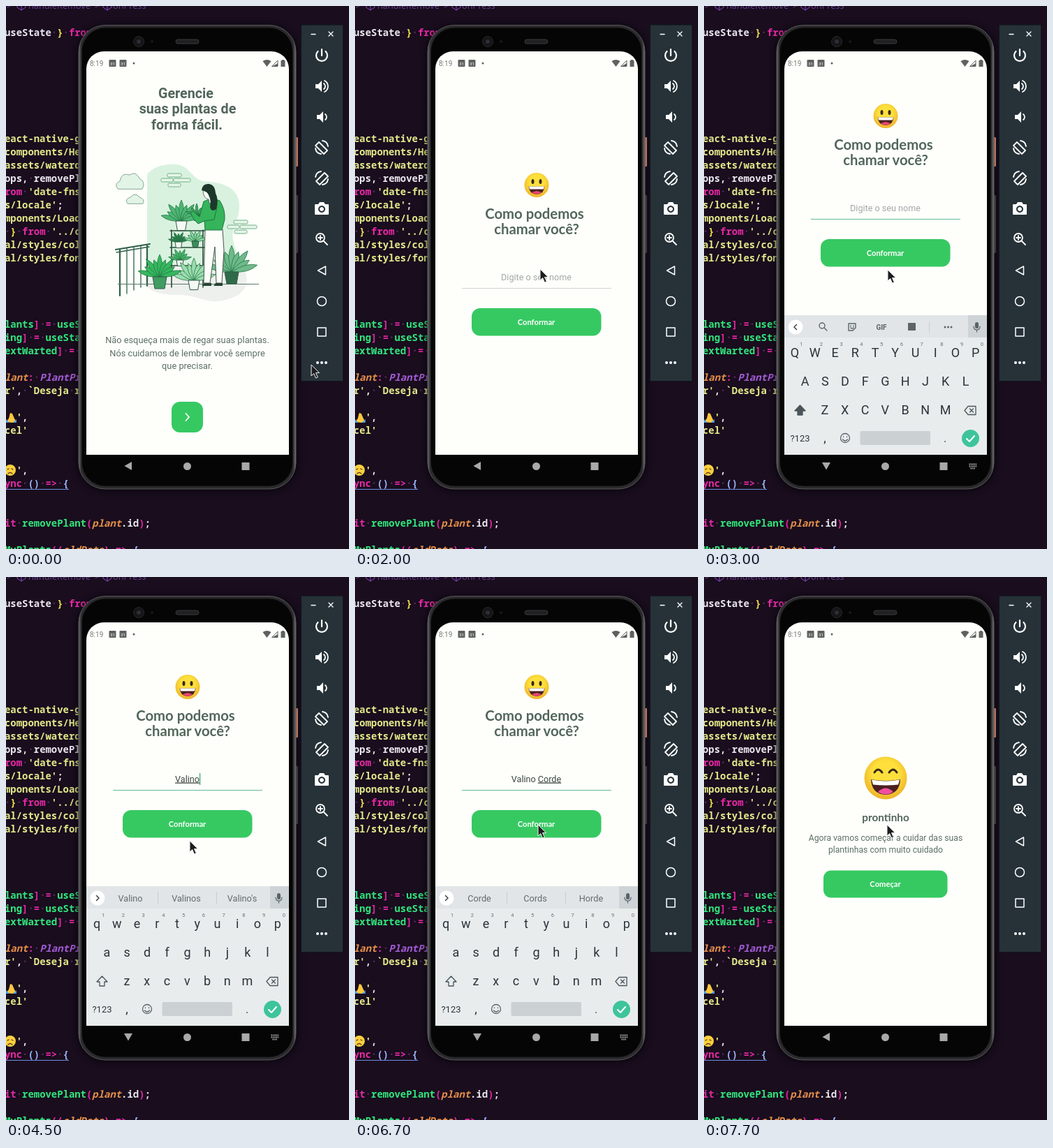
An HTML page that plays this animation: 491 by 778 pixels, repeating every 8 s.

```html
<!DOCTYPE html>
<html lang="pt-BR">
<head>
<meta charset="utf-8">
<title>Plant app onboarding</title>
<style>
  html, body { margin: 0; width: 100%; height: 100%; overflow: hidden; background: #190d1e; }
  svg { display: block; width: 100vw; height: 100vh; }
  text { font-family: Roboto, sans-serif; white-space: pre; }
  .mid text, text.mid { text-anchor: middle; }
  .code text { font: 600 13.93px "Noto Sans Mono", "DejaVu Sans Mono", monospace; }
  .dot { fill: #59265c; }
  .crumb text { font: 12.7px "Noto Sans", sans-serif; }
  .head { font: bold 19.7px Roboto, sans-serif; fill: #52665a; }
  .title { font: bold 20.3px Lato, sans-serif; fill: #52665a; }
  .body { font: 12.8px Lato, sans-serif; fill: #5c6f64; }
  .label { font: bold 11.2px Lato, sans-serif; fill: #fff; }
  .field { font-size: 12.6px; }
  .key { font-size: 18px; fill: #2b3439; }
  .hint { font-size: 7.5px; fill: #667076; }
  .word { font-size: 12.7px; fill: #626b70; }
  .line { fill: none; stroke-linecap: round; stroke-linejoin: round; }

  .anim { animation: 8s step-end infinite; }
  .page { transform-origin: 260px 354px; }
  #welcome { animation-name: welcome; }
  #next { animation-name: next; }
  #ask { animation-name: ask; }
  #lift { animation-name: lift; }
  #rule { animation-name: rule; }
  #confirm { animation-name: confirm; }
  #done { animation-name: done; }
  #keyboard { animation-name: keyboard; }
  #back { animation-name: back; transform-origin: 175px 659px; }
  #kbIcon { animation-name: kbIcon; }
  #cursor { animation-name: cursor; }

  @keyframes welcome {
    0% { opacity: 1; transform: scale(1); }
    12.5% { opacity: .6; transform: scale(1.03); }
    13.75% { opacity: .33; transform: scale(1.075); }
    15% { opacity: .08; transform: scale(1.095); }
    16.25%, 100% { opacity: 0; transform: scale(1.1); }
  }
  @keyframes next { 0% { opacity: 1; } 11.25%, 100% { opacity: .75; } }
  @keyframes ask {
    0% { opacity: 0; transform: scale(.95); }
    15% { opacity: .3; transform: scale(.97); }
    16.25% { opacity: .7; transform: scale(.99); }
    17.5% { opacity: 1; transform: scale(1); }
    87.5% { opacity: .6; transform: scale(1.02); }
    88.75% { opacity: .33; transform: scale(1.06); }
    90% { opacity: .08; transform: scale(1.09); }
    91.25%, 100% { opacity: 0; transform: scale(1.1); }
  }
  @keyframes lift {
    0% { transform: translateY(0); }
    31.25% { transform: translateY(-99px); }
    88.75%, 100% { transform: translateY(0); }
  }
  @keyframes rule { 0% { stroke: #cfd3cf; } 28.75%, 100% { stroke: #63bb92; } }
  @keyframes confirm { 0% { opacity: 1; } 86.25%, 100% { opacity: .7; } }
  @keyframes done {
    0% { opacity: 0; transform: scale(.95); }
    90% { opacity: .2; transform: scale(.96); }
    91.25% { opacity: .5; transform: scale(.98); }
    92.5% { opacity: .8; transform: scale(.99); }
    93.75% { opacity: .95; transform: scale(1); }
    96.25%, 100% { opacity: 1; transform: scale(1); }
  }
  @keyframes keyboard {
    0% { transform: translateY(200px); }
    30% { transform: translateY(140px); }
    31.25% { transform: translateY(60px); }
    32.5% { transform: translateY(15px); }
    33.75% { transform: translateY(0); }
    87.5% { transform: translateY(30px); }
    88.75% { transform: translateY(110px); }
    90%, 100% { transform: translateY(200px); }
  }
  @keyframes back {
    0% { transform: rotate(0deg); }
    30% { transform: rotate(-90deg); }
    88.75%, 100% { transform: rotate(0deg); }
  }
  @keyframes kbIcon { 0% { opacity: 0; } 30% { opacity: 1; } 88.75%, 100% { opacity: 0; } }
  @keyframes cursor {
    0% { transform: translate(437px, 514px); }
    2.5% { transform: translate(404px, 531px); }
    3.75% { transform: translate(345px, 551px); }
    5% { transform: translate(297px, 559px); }
    7.5% { transform: translate(262px, 580px); }
    8.75% { transform: translate(244px, 592px); }
    20% { transform: translate(312px, 433px); }
    21.25% { transform: translate(327px, 453px); }
    25% { transform: translate(265px, 377px); }
    26.25% { transform: translate(263px, 378px); }
    80% { transform: translate(300px, 366px); }
    81.25% { transform: translate(340px, 346px); }
    82.5% { transform: translate(280px, 352px); }
    83.75%, 100% { transform: translate(262px, 355px); }
  }
</style>
</head>
<body>
<svg viewBox="0 0 491 778">
  <defs>
    <clipPath id="glass"><path d="M115 643V90a25 25 0 0 1 25-25H380a25 25 0 0 1 25 25V643z"/></clipPath>
    <radialGradient id="skin" cx=".5" cy=".4" r=".6">
      <stop offset=".5" stop-color="#fde03c"/><stop offset="1" stop-color="#eeb22a"/>
    </radialGradient>
    <linearGradient id="rim">
      <stop offset="0" stop-color="#6a6a6c"/><stop offset=".012" stop-color="#2b2b2d"/>
      <stop offset=".988" stop-color="#2b2b2d"/><stop offset="1" stop-color="#777"/>
    </linearGradient>
    <filter id="shade" x="-10%" y="-5%" width="120%" height="110%"><feGaussianBlur stdDeviation="6"/></filter>
  </defs>
  <rect width="491" height="778" fill="#190d1e"/>

  <g class="crumb" fill="#67408c">
    <text x="1" y="4">&gt;</text><text x="32" y="4">handleRemove</text>
    <text x="127" y="4">&gt;</text><text x="153" y="4">onPress</text>
    <path class="line" stroke="#8a4bc0" d="M16-4v6l6 4 6-4v-6M22 0v6M16-4l6 4 6-4M139-4v6l6 4 6-4v-6M145 0v6M139-4l6 4 6-4"/>
  </g>
  <g class="code" id="code"></g>
  <path d="M0 692.5H90" stroke="#6f8de0"/>
  <g><path d="M0 596l4-5 2-8 3 1 3 7 3 5-6 1z" fill="#fbc83d"/><path d="M0 592l5 5H0zM15 592l-5 5h5z" fill="#4a9be8"/></g>
  <g><circle cx="6" cy="665" r="8" fill="#fbd03e"/><path class="line" stroke="#5c3a16" stroke-width="1.3" d="M2 664l2-1M8 663l2 1M3 670q3-3 6 0"/></g>

  <!-- phone -->
  <rect x="103" y="29" width="313" height="664" rx="38" fill="#000" opacity=".75" filter="url(#shade)"/>
  <rect x="413" y="188" width="5" height="42" rx="1" fill="#b0715c"/>
  <rect x="414" y="271" width="4" height="83" rx="1" fill="#38363a"/>
  <rect x="104" y="27.500" width="311" height="664.500" rx="38" fill="url(#rim)" stroke="#59595b"/>
  <rect x="108.500" y="31" width="302" height="657" rx="34" fill="#050505" stroke="#1c1c1e"/>
  <circle cx="190" cy="51" r="7.500" fill="#151517" stroke="#28282b"/>
  <circle cx="190" cy="51" r="3" fill="#2d2f36"/><circle cx="209" cy="51" r="2" fill="#19191b"/>
  <rect x="243" y="48" width="33" height="6" rx="3" fill="#202022" stroke="#39393b"/>

  <g clip-path="url(#glass)">
    <rect x="115" y="65" width="290" height="578" fill="#fefffb"/>

    <g class="page anim mid" id="welcome">
      <g class="head"><text x="257.500" y="131.500">Gerencie</text><text x="260" y="154">suas plantas de</text><text x="259" y="177">forma fácil.</text></g>
      <path d="M202 398V241q14-16 42-14c20 2 22 22 40 24c26 2 50 8 50 36c0 22-14 32-8 52c4 20 16 30 12 44q-2 14-18 15z" fill="#d9f2df"/>
      <path d="M206 372c-20 32 6 42 40 42s42 16 72 6c26-7 32-24 22-48z" fill="#eef0ed"/>
      <path class="line" stroke="#86a894" fill="#e2f4e6" d="M160 262q-6-7 3-11q2-13 14-9q9-6 14 5q10 6 4 15zM174 283q-5-6 4-9q7-8 13 0q9 3 5 9z" style="fill:#e2f4e6"/>
      <g id="bricks" fill="#e6f6e9" stroke="#6fae85"></g>
      <path class="line" stroke="#2f6148" stroke-width="2.200" d="M157 349l49-8M163 348v67M202 342v59"/>
      <path class="line" stroke="#2f6148" stroke-width="1.300" d="M173 347v65M183 346v61M193 344v59M158 353l47-8"/>
      <path d="M160 398.500H362" stroke="#5b7a69"/>
      <path class="line" stroke="#294c3a" stroke-width="1.600" d="M237 321v82M282 321v82M235 322h50M235 346h50M235 372h50"/>
      <g id="plants"></g>
      <!-- gardener -->
      <path d="M285 320h25l2 30-3 47h-8l-2-52-7 52h-9z" fill="#fdfefa" stroke="#44564b"/>
      <path d="M284 397h10v4h-13zM300 397h10v4h-13z" fill="#274434"/>
      <path d="M283 280q13-6 23-1q8 12 7 27l-4 15h-24l-1-13-9 4q-8-7-11-16l4-2 9 8z" fill="#35b45b" stroke="#1f7440"/>
      <path class="line" stroke="#1f7440" d="M302 288l-4 18-14 2"/>
      <path d="M282 263q0 13 8 14l1 6 6-2-1-16z" fill="#fbfcf8" stroke="#44564b" stroke-width=".8"/>
      <path d="M280 264q1-10 11-9q8 1 9 13q5 10 1 23q-7 5-9-3q2-10-2-17q-1-5-10-7z" fill="#1d382a"/>
      <g class="anim" id="next"><rect x="237" y="567" width="45" height="44" rx="12" fill="#36c962"/><path class="line" stroke="#fff" stroke-width="1.800" d="M257.500 584l4.500 5-4.500 5"/></g>
      <g class="body"><text x="259.500" y="483">Não esqueça mais de regar suas plantas.</text><text x="259.500" y="501.500">Nós cuidamos de lembrar você sempre</text><text x="259.500" y="520">que precisar.</text></g>
    </g>

    <g class="page anim mid" id="ask"><g class="anim" id="lift">
      <g transform="translate(260 256.500)">
        <circle r="17.500" fill="url(#skin)"/>
        <ellipse cx="-5.500" cy="-5" rx="2" ry="3.500" fill="#38281a"/><ellipse cx="5.500" cy="-5" rx="2" ry="3.500" fill="#38281a"/>
        <path d="M-11.500 2h23q-1 11-11.500 11.500q-10.500-.5-11.500-11.500z" fill="#4a2020"/>
        <path d="M-11 2h22l-1 4h-20z" fill="#fff"/><path d="M-7 11q7-5 14 0q-7 4.500-14 0z" fill="#e8456f"/>
      </g>
      <text class="title" x="257" y="305">Como podemos</text><text class="title" x="260" y="327">chamar você?</text>
      <text class="field" id="field" x="259.500" y="392.500"></text>
      <rect id="caret" y="380" width="1.300" height="17" fill="#3fa873"/>
      <path class="anim" id="rule" d="M153 404.500H367" stroke-width="1.200"/>
      <g class="anim" id="confirm"><rect x="167" y="433" width="185.500" height="39.500" rx="12" fill="#36c962"/><text class="label" x="259.500" y="457">Conformar</text></g>
    </g></g>

    <g class="page anim mid" id="done">
      <g transform="translate(260 288)">
        <circle r="30.500" fill="url(#skin)"/>
        <path class="line" stroke="#38281a" stroke-width="3" d="M-16-8q5-8 11 0M5-8q6-8 11 0"/>
        <path d="M-21 2q21 4 42 0q-1 21-21 22q-20-1-21-22z" fill="#4a2020"/>
        <path d="M-20 2.500q20 4 40 0l-2 7q-18 2-36 0z" fill="#fff"/><path d="M-11 20q11-11 22 0q-11 7-22 0z" fill="#f0509f"/>
      </g>
      <text class="title" x="260" y="350" style="font-size:15.300px">prontinho</text>
      <g class="body" style="font-size:12.200px"><text x="260" y="378">Agora vamos começar a cuidar das suas</text><text x="260" y="395">plantinhas com muito cuidado</text></g>
      <rect x="171" y="420.500" width="177.500" height="39" rx="11" fill="#36c962"/><text class="label" x="259.500" y="444">Começar</text>
    </g>

    <text x="120" y="86" font-size="10" fill="#777b78">8:19</text>
    <g fill="#5e615f"><rect x="147.500" y="77" width="10" height="10" rx="1"/><rect x="162.500" y="77" width="10" height="10" rx="1"/><circle cx="183" cy="82" r="1.500"/>
      <path d="M367.500 79q6-4 12 0l-6 8zM393.500 78h1.500v-1h3v1h1.500v9h-6z"/><path d="M389 78v8.500h-8.500z" fill="none" stroke="#5e615f"/><path d="M389 82v4.500h-8z"/></g>
    <g class="mid" fill="#fff" font-size="6"><text x="152.500" y="85">31</text><text x="167.500" y="85">31</text></g>

    <g class="anim mid" id="keyboard">
      <rect x="115" y="443" width="290" height="200" fill="#e8eced"/>
      <rect x="115" y="443" width="290" height="32" fill="#e1e5e7"/><rect x="378" y="443" width="27" height="32" fill="#cdd3d6"/>
      <circle cx="131" cy="460" r="10.500" fill="#fff"/><path class="line" id="chevron" stroke="#3c464b" stroke-width="1.500"/>
      <g id="tools" fill="#5b656a">
        <path class="line" stroke="#5b656a" stroke-width="1.400" d="M172 461l4 4M207 455h10v6l-4 4h-6zM210 458v1M214 458v1M210 461q2 2 4 0"/>
        <circle cx="169" cy="458" r="4" fill="none" stroke="#5b656a" stroke-width="1.400"/>
        <text x="254" y="463.500" font-size="10" font-weight="bold">GIF</text><rect x="292" y="454" width="11" height="11" rx="1"/>
        <path d="M322.500 452v16" stroke="#ccd1d4"/><circle cx="345" cy="460" r="1.500"/><circle cx="349.500" cy="460" r="1.500"/><circle cx="354" cy="460" r="1.500"/>
      </g>
      <g id="hints"><path d="M217.500 451v17M301.500 451v17" stroke="#c6ccd0"/><text class="word" x="178" y="464.500"/><text class="word" x="258" y="464.500"/><text class="word" x="338" y="464.500"/></g>
      <rect x="388" y="453" width="5" height="9" rx="2.500" fill="#596267"/><path class="line" stroke="#596267" stroke-width="1.200" d="M386 459q0 5 4.500 5t4.500-5M390.500 464v3"/>
      <g id="keys"></g>
      <path id="shift" d="M137.500 572l7.500 8h-4v6h-7v-6h-4z" stroke="#4b555a" stroke-width="1.300" stroke-linejoin="round"/>
      <path class="line" stroke="#4b555a" stroke-width="1.300" d="M373 579.500l5-6h11v12h-11zM380.500 577l5 5M385.500 577l-5 5"/>
      <text x="137.500" y="624" font-size="13" fill="#2b3439">?123</text><text class="key" x="173" y="625">,</text><text class="key" x="345" y="625" fill-opacity=".7">.</text>
      <g class="line" stroke="#5b656a" stroke-width="1.300"><circle cx="202" cy="619" r="6.500"/><path d="M199.500 617v.5M204.500 617v.5M198.500 621q3.500 4 7 0"/></g>
      <rect x="223.500" y="609" width="100.500" height="20" rx="2" fill="#cbd0d3"/>
      <circle cx="381.500" cy="619.500" r="12.500" fill="#3ec49a"/><path class="line" stroke="#fff" stroke-width="2" d="M376 620l4 4 7-8"/>
    </g>
  </g>

  <g fill="#a9a9a9">
    <path class="anim" id="back" d="M180 653v12l-10.500-6z"/><circle cx="259.500" cy="659.500" r="5.500"/><rect x="337.500" y="654" width="11" height="11"/>
    <path class="anim" id="kbIcon" d="M379.500 659.500h11M379.500 656.500h11M381.500 662.500h7" stroke="#a9a9a9" stroke-width="2" stroke-dasharray="1.500 .8"/>
  </g>

  <!-- emulator controls -->
  <rect x="422.500" y="27" width="60" height="510.500" fill="#263238" stroke="#11171b"/>
  <g class="line" stroke="#fff" stroke-width="1.800" transform="translate(452 0)">
    <path stroke-width="1.300" d="M-15 40.500h6M10 37l6 6M16 37l-6 6"/>
    <path stroke-width="2.200" d="M-5.500 65a8 8 0 1 0 11 0M0 62v9"/>
    <path fill="#fff" stroke="none" d="M-9 112h4l5-5v16l-5-5h-4zM-7 156h4l5-5v16l-5-5h-4z"/>
    <path d="M3 111a5 5 0 0 1 0 8M4 107a9 9 0 0 1 0 16M5 155a5 5 0 0 1 0 8"/>
    <g id="turn"><path d="M-4-8l12 12-5 5-12-12zM-9 1q1 7 8 8M9-2q-1-7-8-8" transform="translate(0 203)"/><path d="M4-8l-12 12 5 5 12-12zM9 1q-1 7-8 8M-9-2q1-7 8-8" transform="translate(0 247)"/></g>
    <path fill="#fff" stroke="none" fill-rule="evenodd" d="M-9 284h4l2-3h6l2 3h4q1 0 1 1v13q0 1-1 1h-18q-1 0-1-1v-13q0-1 1-1zM0 286a5 5 0 1 0 .01 0zM0 288a3 3 0 1 1-.01 0z"/>
    <circle cx="-2" cy="332" r="6"/><path d="M3 337l5 5M-5 332h6M-2 329v6"/>
    <path stroke-width="1.500" d="M5.500 373v12l-11-6z"/><circle cy="423" r="6.500" stroke-width="1.500"/><rect x="-6" y="461" width="12" height="12" stroke-width="1.500"/>
    <path stroke-width="4" d="M-6 511h.01M0 511h.01M6 511h.01"/>
  </g>

  <path class="anim" id="cursor" d="M0 0v16l3.700-3.400 2.800 6.400 2.800-1.200-2.800-6.200h5z" fill="#1d1d1f" stroke="#f2f2f2" stroke-width="1"/>
</svg>

<script>
const $ = id => document.getElementById(id);

const ink = { w: '#ece7f0', y: '#e3ea8a', b: '#f3e04a', p: '#e728a4', g: '#31e67c', o: '#e58f49', v: '#a45cd6', l: '#9fb6ff' };
// Each token starts with its colour letter.
const code = [
  [38, 'wuseState ', 'b} ', 'pfrom'],
  [190, 'yeact-native-g'], [209, 'ycomponents/He'], [228, 'yassets/waterdr'],
  [247, 'wops, removePl'], [266, 'prom ', "y'date-fns"], [285, "ys/locale'", 'w;'],
  [304, 'ymponents/Load'], [323, 'b } ', 'pfrom ', "y'../c"],
  [342, 'yal/styles/col'], [361, 'yal/styles/font'],
  [456, 'glants', 'p] = ', 'guseS'], [475, 'ging', 'p] = ', 'guseSta'], [494, 'gextWarted', 'p] = '],
  [532, 'olant', 'p: ', 'vPlantPr'], [551, "yr'", 'w, ', 'y`Deseja r'],
  [589, "y\u00a0\u00a0'", 'w,'], [608, "ycel'"], [665, "y\u00a0\u00a0'", 'w,'],
  [684, 'pync ', 'l() ', 'p=> ', 'l{'],
  [741, 'pit ', 'gremovePlant', 'p(', 'oplant', 'w.id', 'p)', 'w;'],
  [779, 'gMyPlants', 'p((', 'ooldData', 'p) => ', 'l{']
];
const token = s => {
  const style = 'ov'.includes(s[0]) ? ' font-style="italic"' : '';
  const body = s.slice(1).replace('>', '&gt;').replace(/ /g, '<tspan class="dot">·</tspan>');
  return `<tspan fill="${ink[s[0]]}"${style}>${body}</tspan>`;
};
$('code').innerHTML = code.map(([y, ...parts]) =>
  `<text x="-2" y="${y + 5}">${parts.map(token).join('')}</text>`).join('');

const brick = (x, y, w) => `<rect x="${x}" y="${y}" width="${w}" height="5" rx="1.5"/>`;
const wall = (x, y) => brick(x + 9, y, 20) + brick(x, y + 7, 17) + brick(x + 18, y + 7, 24) + brick(x + 10, y + 14, 18);
$('bricks').innerHTML = wall(222, 240) + wall(317, 307);

// A fan of leaves above a pot: base, leaf count, leaf length, leaf colour, pot width and colour.
function plant(x, y, count, size, color, pot, potColor) {
  let out = '';
  for (let i = 0; i < count; i++) {
    const a = -75 + 150 * i / (count - 1), h = size * (i % 2 ? .8 : 1), w = size * .22;
    out += `<path d="M0 0Q${-w} ${-h * .6} 0 ${-h}Q${w} ${-h * .6} 0 0" transform="translate(${x} ${y}) rotate(${a})" fill="${color}" stroke="#1f7440" stroke-width=".7"/>`;
  }
  return out + `<path d="M${x - pot} ${y}h${2 * pot}l${-pot * .3} ${pot * 1.7}h${-pot * 1.4}z" fill="${potColor}" stroke="#2f5a44"/>`;
}
$('plants').innerHTML =
  plant(251, 308, 9, 30, '#4fb574', 8, '#f6faf5') +
  plant(247, 338, 7, 15, '#2c7a4a', 5, '#f6faf5') +
  plant(271, 337, 7, 17, '#8ed6a3', 5, '#3a8f5a') +
  plant(249, 364, 7, 17, '#49b56b', 5, '#f6faf5') +
  plant(273, 299, 5, 16, '#3aa25d', 5, '#2f6a49') +
  plant(323, 381, 9, 38, '#6fb98a', 10, '#2f6a49') +
  plant(269, 393, 9, 32, '#9bdcae', 8, '#f6faf5') +
  plant(220, 388, 9, 32, '#36b75f', 10, '#3f9d62');

let keys = '';
[['qwertyuiop', 130, 503], ['asdfghjkl', 144.5, 544], ['zxcvbnm', 173, 585]].forEach(([row, x0, y], r) =>
  [...row].forEach((c, i) => {
    const x = x0 + 28.75 * i;
    keys += `<text class="key" x="${x}" y="${y}">${c}</text>`;
    if (!r) keys += `<text class="hint" x="${x + 9}" y="487">${(i + 1) % 10}</text>`;
  }));
$('keys').innerHTML = keys;
const letters = [...document.querySelectorAll('#keys .key')];
const words = [...document.querySelectorAll('.word')];

const name = 'Valino Corde';
const presses = [3500, 3700, 3900, 4100, 4300, 4500, 5000, 5300, 5500, 5600, 5800, 5900];
let shown = -1;

function suggest(word) {
  if (!word) return ['is', 'and', 'has'];
  if (word === 'Corde') return ['Corde', 'Cords', 'Horde'];
  return [word, word + 's', word + "'s"];
}

function type(n) {
  const typed = name.slice(0, n), cut = typed.lastIndexOf(' ') + 1, word = typed.slice(cut);
  $('field').setAttribute('fill', n ? '#3b4540' : '#a3a8a5');
  $('field').innerHTML = n
    ? typed.slice(0, cut).replace(' ', '\u00a0') + `<tspan text-decoration="underline">${word}</tspan>`
    : 'Digite o seu nome';
  $('caret').setAttribute('x', 259.5 + (n ? $('field').getComputedTextLength() / 2 : 0));
  letters.forEach(k => k.textContent = n ? k.textContent.toLowerCase() : k.textContent.toUpperCase());
  suggest(word).forEach((s, i) => words[i].textContent = s);
  $('tools').style.display = n ? 'none' : '';
  $('hints').style.display = n ? '' : 'none';
  $('shift').setAttribute('fill', n ? 'none' : '#4b555a');
  $('chevron').setAttribute('d', n ? 'M129.500 456.500l3.500 3.500-3.500 3.500' : 'M132.500 456.500l-3.500 3.500 3.500 3.500');
}

let start;
function tick(now) {
  start ??= now;
  const t = (now - start) % 8000;
  const n = presses.filter(p => p <= t).length;
  if (n !== shown) type(shown = n);
  const since = t - (n ? presses[n - 1] : 2500);
  $('caret').style.display = since >= 0 && t < 6900 && since % 1000 < 500 ? '' : 'none';
  requestAnimationFrame(tick);
}
requestAnimationFrame(tick);
</script>
</body>
</html>
```
